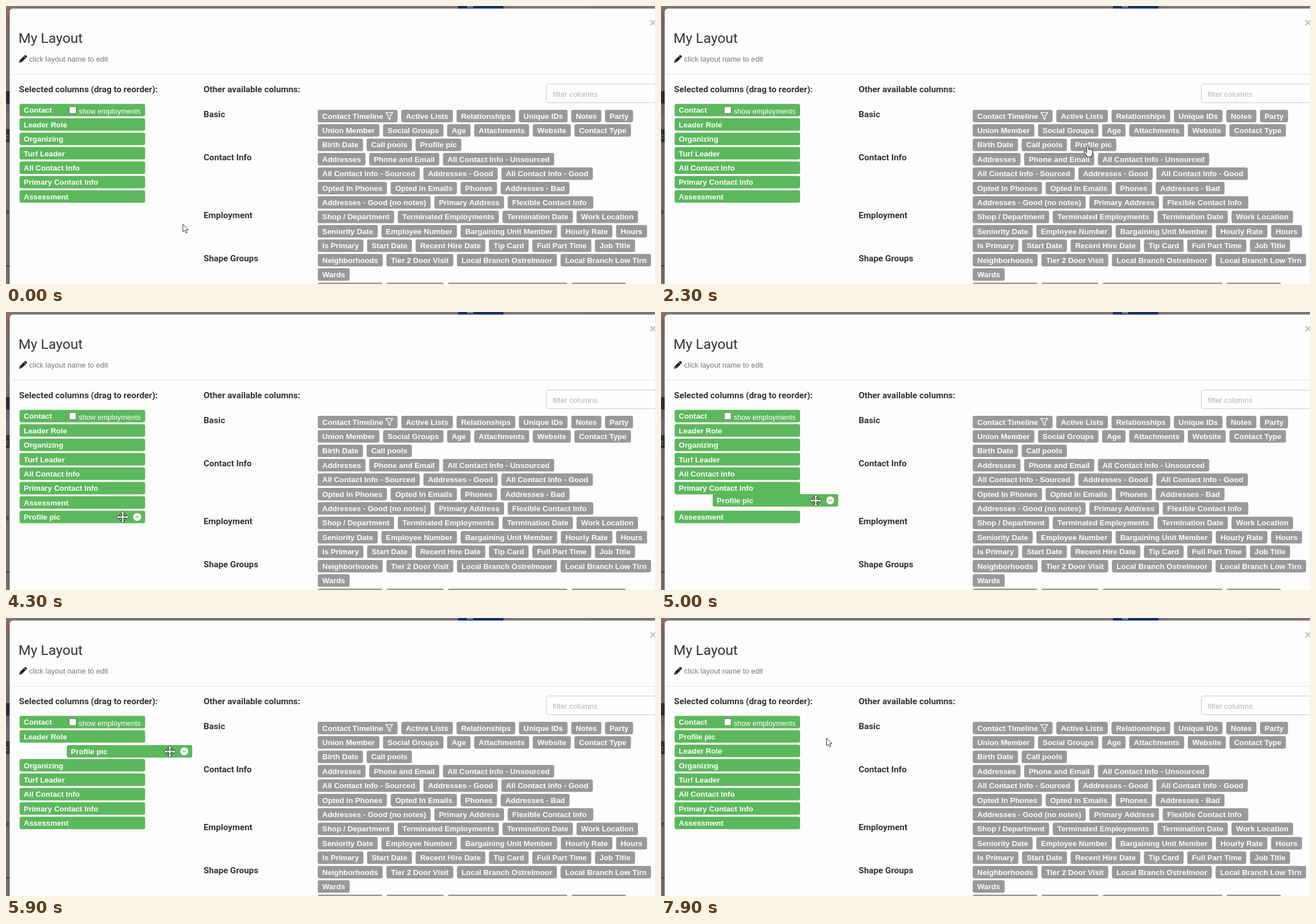
An HTML page with a canvas that plays this animation: 1143x490 px, repeating every 8 s.

```html
<!DOCTYPE html>
<html lang="en">
<head>
<meta charset="utf-8">
<title>Layout editor</title>
<style>
  html, body { margin: 0; width: 100%; height: 100%; overflow: hidden; background: #fdfdfd; }
  canvas { display: block; }
</style>
</head>
<body>
<canvas id="stage" width="1143" height="490"></canvas>
<script>
const ctx = document.getElementById('stage').getContext('2d');
const FONT = '"Liberation Sans", Arial, sans-serif';
const HEAD_FONT = 'Roboto, sans-serif';
const BOLD = `bold 13.33px ${FONT}`;
const LOOP = 8000, STEP = 100, PITCH = 25.4;
const ADDED = 'Profile pic', ADD_AT = 2900, DRAG_AT = 4800, DROP_AT = 7400, SETTLE = 400;
const GRAB = { x: 181, y: 11 };
const LIST = { x: 24, y: 172.4, w: 221, h: 22 };

const selected = ['Contact', 'Leader Role', 'Organizing', 'Turf Leader',
  'All Contact Info', 'Primary Contact Info', 'Assessment'];

const chipRows = [
  'Contact Timeline|Active Lists|Relationships|Unique IDs|Notes|Party',
  'Union Member|Social Groups|Age|Attachments|Website|Contact Type',
  'Birth Date|Call pools|Profile pic',
  'Addresses|Phone and Email|All Contact Info - Unsourced',
  'All Contact Info - Sourced|Addresses - Good|All Contact Info - Good',
  'Opted In Phones|Opted In Emails|Phones|Addresses - Bad',
  'Addresses - Good (no notes)|Primary Address|Flexible Contact Info ',
  'Shop / Department|Terminated Employments|Termination Date|Work Location',
  'Seniority Date|Employee Number|Bargaining Unit Member|Hourly Rate|Hours',
  'Is Primary|Start Date|Recent Hire Date|Tip Card|Full Part Time|Job Title',
  'Neighborhoods|Tier 2 Door Visit|Local Branch Ostrelmoor|Local Branch Low Tirn',
  'Wards'
];
const groups = [['Basic', 0], ['Contact Info', 3], ['Employment', 7], ['Shape Groups', 10]];

// Pointer path: time, x, y
const path = [
  [0, 311, 384], [300, 318, 380], [800, 318, 380], [2300, 751, 245], [2800, 751, 245],
  [3700, 224, 357], [4300, 205, 361], [4700, 205, 361], [5000, 272, 332], [5900, 288, 235],
  [6300, 289, 228], [6600, 289, 228], [6900, 291, 213], [7300, 291, 211], [LOOP, 291, 211]
];

const smooth = k => k * k * (3 - 2 * k);
const mix = (a, b, k) => a + (b - a) * k;
const inside = (p, r) => p.x >= r.x && p.x < r.x + r.w && p.y >= r.y && p.y < r.y + r.h;

function rect(x, y, w, h, color) {
  ctx.fillStyle = color;
  ctx.fillRect(x, y, w, h);
}

function box(x, y, w, h, r, fill, stroke) {
  ctx.beginPath();
  ctx.roundRect(x, y, w, h, r);
  ctx.fillStyle = fill;
  ctx.fill();
  if (stroke) {
    ctx.strokeStyle = stroke;
    ctx.lineWidth = 1;
    ctx.stroke();
  }
}

function text(s, x, y, font, color) {
  ctx.font = font;
  ctx.fillStyle = color;
  ctx.fillText(s, x, y);
}

function shape(d, x, y, fill, stroke, width = 1) {
  const p = new Path2D(d);
  ctx.save();
  ctx.translate(x, y);
  if (fill) { ctx.fillStyle = fill; ctx.fill(p); }
  if (stroke) {
    ctx.strokeStyle = stroke;
    ctx.lineWidth = width;
    ctx.lineJoin = 'round';
    ctx.stroke(p);
  }
  ctx.restore();
}

function layoutChips() {
  ctx.font = BOLD;
  return chipRows.flatMap((row, i) => {
    let x = 549;
    return row.split('|').map(label => {
      const w = ctx.measureText(label).width + 16 + (label === 'Contact Timeline' ? 17.5 : 0);
      const chip = { label, x, y: 182.9 + PITCH * i, w, h: 22 };
      x += w + 6.5;
      return chip;
    });
  });
}
const chips = layoutChips();

function pointerAt(t) {
  const i = path.findIndex(k => k[0] > t);
  const [t0, x0, y0] = path[i - 1], [t1, x1, y1] = path[i];
  const k = smooth((t - t0) / (t1 - t0));
  return { x: mix(x0, x1, k), y: mix(y0, y1, k) };
}

function drawBackdrop() {
  rect(0, 0, 1143, 490, '#7f7d7f');
  rect(0, 0, 7, 30, '#976d6b');
  rect(0, 150, 7, 22, '#343336');
  rect(0, 172, 7, 18, '#74717a');
  rect(0, 217, 7, 23, '#3a393b');
  rect(0, 457, 7, 2, '#444');
  rect(796, 0, 80, 5, '#15346a');
  rect(812, 0, 11, 3, '#7a8099');
  rect(893, 0, 129, 5, '#858385');
  text('c', -1, 234, `12px ${FONT}`, '#999');
  text('e', -2, 367, `13px ${FONT}`, '#222');
  ctx.save();
  ctx.shadowColor = 'rgba(0, 0, 0, .4)';
  ctx.shadowBlur = 15;
  ctx.shadowOffsetY = 5;
  box(6.5, 4.5, 1150, 500, 6, '#fdfdfd');
  ctx.restore();
}

function drawHeader() {
  text('My Layout', 22, 65, `24.7px ${HEAD_FONT}`, '#333');
  shape('M0 14L1 9.5 10 .8Q11.2 0 12.4 1L13.4 2Q14.4 3.2 13.4 4.4L4.6 13Z', 23, 86, '#222');
  shape('M8.6 2.6L11.8 5.8M1.7 10.2L3.8 12.3', 23, 86, null, '#fdfdfd', 0.9);
  text('click layout name to edit', 40.5, 98, `13.05px ${FONT}`, '#777');
  text('×', 1133, 37, `bold 22px ${FONT}`, '#c4c4c4');
  rect(6, 120, 1137, 1, '#e5e5e5');
  const heading = `bold 15.3px ${HEAD_FONT}`;
  text('Selected columns (drag to reorder):', 23, 152, heading, '#333');
  text('Other available columns:', 348, 152, heading, '#333');
  for (const [name, row] of groups) text(name, 348, 196 + PITCH * row, heading, '#333');
  box(951.5, 137.5, 220, 33, 4, '#fefefe', '#c9c9c9');
  text('filter columns', 963, 160, `13.4px ${FONT}`, '#b3b3b3');
}

function drawChips(visible) {
  for (const { label, x, y, w, h } of visible) {
    box(x, y, w, h, 3.3, '#999');
    text(label, x + 8, y + 15.7, BOLD, '#fff');
  }
  shape('M.7 .7H13.3L8.6 7V13.2L5.4 10.8V7Z', 668, 187, null, '#fff', 1.3);
  for (const [x, w] of [[549, 114], [670, 101], [778, 211], [996, 96]])
    box(x, 487.5, w, 22, 3.3, '#999');
}

function drawItem(label, x, y, hovered) {
  box(x, y, LIST.w, LIST.h, 3.3, '#5cb85c');
  text(label, x + 7.3, y + 16, BOLD, '#fff');
  if (label === 'Contact') {
    box(111.5, 177.5, 12, 12, 2, '#fff', '#767676');
    text('show employments', 128, 190.3, `12.75px ${FONT}`, '#fff');
  } else if (hovered) {
    ctx.beginPath();
    ctx.arc(x + 207, y + 11, 7, 0, 7);
    ctx.fillStyle = '#fff';
    ctx.fill();
    rect(x + 204, y + 10.3, 6, 1.4, '#5cb85c');
  }
}

const slotTop = i => LIST.y + PITCH * i;

// Rows in drawing order; the lifted row comes last, on top of the others.
function itemsAt(t, pointer) {
  if (t < ADD_AT) return selected.map((label, i) => ({ label, x: LIST.x, y: slotTop(i) }));
  let slot = 7, x = LIST.x, y = slotTop(slot);
  if (t >= DRAG_AT) {
    x = pointer.x - GRAB.x;
    y = pointer.y - GRAB.y;
    slot = Math.max(1, Math.min(7, Math.round((y - LIST.y) / PITCH)));
    const k = smooth(Math.max(0, Math.min(1, (t - DROP_AT) / SETTLE)));
    x = mix(x, LIST.x, k);
    y = mix(y, slotTop(slot), k);
  }
  const rows = selected.map((label, i) => ({ label, x: LIST.x, y: slotTop(i < slot ? i : i + 1) }));
  return [...rows, { label: ADDED, x, y }];
}

const cursors = {
  arrow: ['M0 0V13.5L3.2 10.7 5.4 15.8 7.7 14.8 5.5 9.8H9.6Z', '#fff', '#333'],
  hand: ['M-1.6 1Q0-1.2 1.6 1V7.2Q3.2 6 4.3 7.7 6 6.8 6.9 8.5 8.8 8 9 10.2V14.5L7 18.4V20.5H-1.8V18.4L-6 12.6Q-7 10.6-5 10.4L-1.6 13Z',
    '#fff', '#111'],
  move: ['M0-10L4-6H1.6V-1.6H6V-4L10 0 6 4V1.6H1.6V6H4L0 10-4 6H-1.6V1.6H-6V4L-10 0-6-4V-1.6H-1.6V-6H-4Z',
    '#fff', '#222']
};

function draw(t) {
  const pointer = pointerAt(t);
  const visible = t < ADD_AT ? chips : chips.filter(c => c.label !== ADDED);
  const items = itemsAt(t, pointer);
  const dragging = t >= DRAG_AT && t < DROP_AT;
  const hovered = dragging ? items[items.length - 1]
    : items.find(i => inside(pointer, { ...i, w: LIST.w, h: LIST.h }));

  drawBackdrop();
  drawHeader();
  drawChips(visible);
  for (const item of items) drawItem(item.label, item.x, item.y, item === hovered);

  const kind = hovered ? 'move' : visible.some(c => inside(pointer, c)) ? 'hand' : 'arrow';
  const [d, fill, stroke] = cursors[kind];
  shape(d, Math.round(pointer.x) + 0.5, Math.round(pointer.y) + 0.5, fill, stroke);
}

function tick() {
  draw(Math.floor(performance.now() % LOOP / STEP) * STEP);
  requestAnimationFrame(tick);
}
tick();
</script>
</body>
</html>
```
